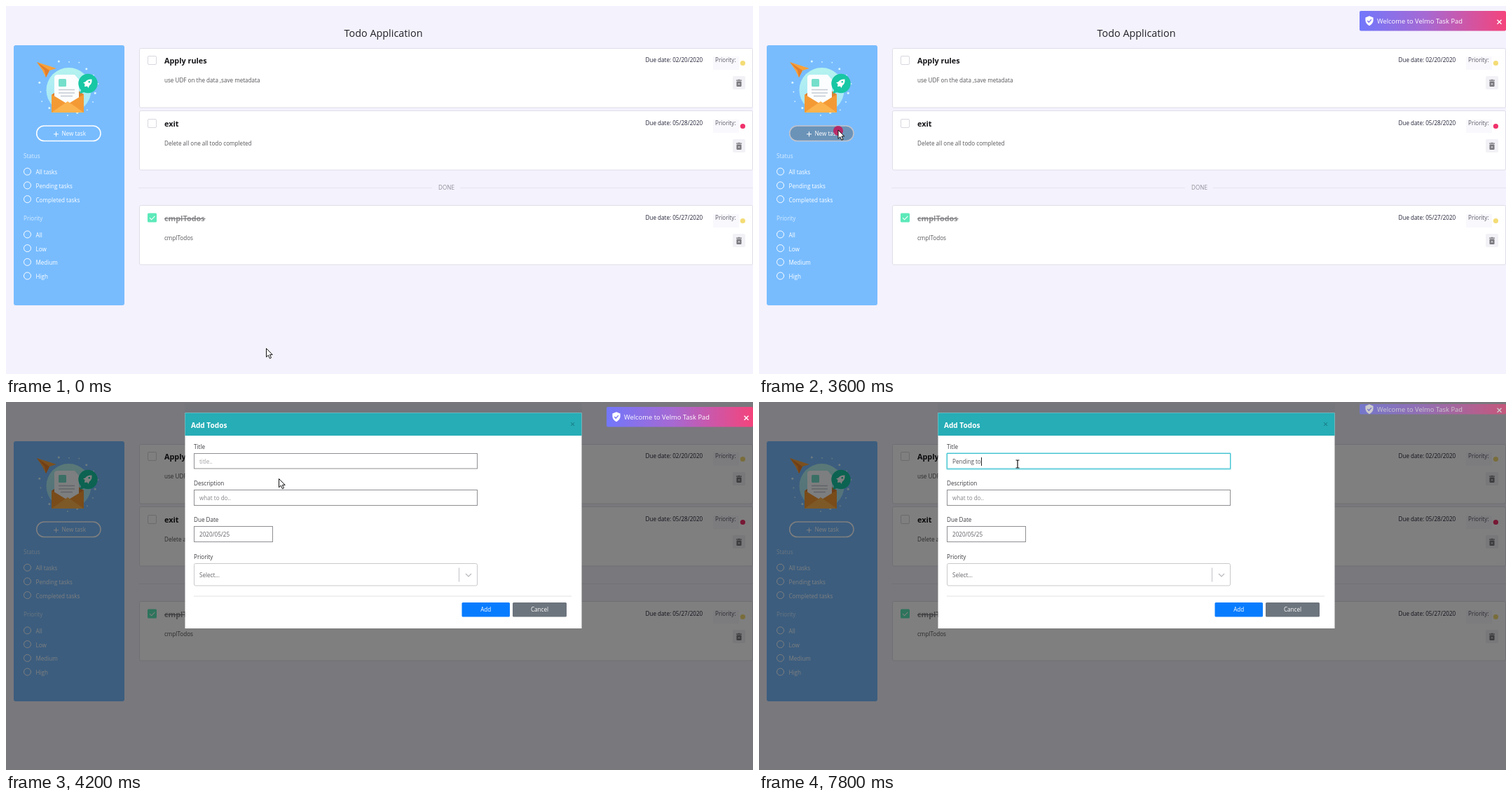
These frames come from a looping animation (1066 by 525 pixels, 8000 ms). An HTML page:

```html
<!DOCTYPE html>
<html lang="en">
<head>
<meta charset="utf-8">
<title>Todo board</title>
<style>
  html, body { margin: 0; width: 100%; height: 100%; overflow: hidden; background: #f4f2fc; }
  svg { display: block; width: 1066px; height: 525px; }
  text { font: 8.12px "Open Sans", "Noto Sans", sans-serif; white-space: pre; }
  .mid { text-anchor: middle; }
  .head { font-size: 14.4px; font-weight: 500; }
  .bold { font-size: 10.85px; font-weight: 700; }
</style>
</head>
<body>
<svg id="stage" viewBox="0 0 1066 525" xmlns="http://www.w3.org/2000/svg"></svg>
<script>
const LOOP = 8000, STEP = 200;
const stage = document.getElementById('stage');

const text = (x, y, s, fill, more = '') => `<text x="${x}" y="${y}" fill="${fill}" ${more}>${s}</text>`;
const rect = (x, y, w, h, fill, more = '') =>
  `<rect x="${x}" y="${y}" width="${w}" height="${h}" fill="${fill}" ${more}/>`;
const circle = (x, y, r, fill, more = '') => `<circle cx="${x}" cy="${y}" r="${r}" fill="${fill}" ${more}/>`;
const path = (d, fill, more = '') => `<path d="${d}" fill="${fill}" ${more}/>`;
const line = (d, color, width = 1) => path(d, 'none', `stroke="${color}" stroke-width="${width}"`);
const group = (id, body, more = '') => `<g id="${id}" ${more}>${body}</g>`;

const tasks = [
  { top: 60.5, dy: 0, name: 'Apply rules', note: 'use UDF on the data ,save metadata', due: '02/20/2020', dot: '#f4dc76' },
  { top: 149.5, dy: 90, name: 'exit', note: 'Delete all one all todo completed', due: '05/28/2020', dot: '#f0316b' },
  { top: 284.5, dy: 225, name: 'cmplTodos', note: 'cmplTodos', due: '05/27/2020', dot: '#f4dc76', done: true }
];

function bin(y, box, ink, hole) {
  return rect(1037, y - 10, 18, 19, box, 'rx="2"') +
    rect(1042.5, y - 2.5, 7, 7.5, ink, 'rx="1"') + rect(1042, y - 4.5, 8, 1.2, ink) +
    rect(1044.5, y - 5.2, 3, 1, ink) +
    line(`M1044.7 ${y}l2.6 2.8m0 -2.8l-2.6 2.8`, hole, .8);
}

function card({ top, dy, name, note, due, dot, done }) {
  const box = done
    ? rect(202, 70.5, 13, 13, '#5ce9ba', 'rx="1.5"') + line('M205 77.2l2.6 2.6 4.8-5', '#fff', 1.1)
    : rect(202.5, 71.5, 12, 12, '#fff', 'rx="1.5" stroke="#d8d7df"');
  return rect(190.5, top, 875, 84.5, '#fff', 'rx="2" stroke="#dfdde7"') +
    `<g transform="translate(0 ${dy})">` + box +
    text(226, 82, name, done ? '#8e8e92' : '#16161a', 'class="bold"') +
    (done ? line('M226 78.5H284.5', '#77777b', 1.2) : '') +
    text(226, 108.6, note, '#55555a') +
    text(912.5, 80.3, 'Due date: ' + due, '#222238') +
    rect(1009, 72, 37, 19, '#f9f8fd') + text(1012, 80.3, 'Priority:', '#5a5a66') +
    circle(1051.4, 81.5, 3.6, dot) + bin(110, '#f2f1f6', '#77777c', '#f2f1f6') + '</g>';
}

function picture() {
  let dots = '';
  for (let i = 0; i < 18; i++) {
    const a = i * .349 + .2, r = 39 + (i * 7 % 5);
    dots += circle((89 + r * Math.cos(a)).toFixed(1), (117 + r * .93 * Math.sin(a)).toFixed(1), i % 3 ? .9 : 1.5, '#d9f6ff');
  }
  return dots + circle(89.5, 120, 32, 'url(#glow)') +
    path('M44 80L72 89 62 92 57 102 52 92Z', '#f7a13c') + path('M44 80L62 92 57 102 55 92Z', '#e37f2c') +
    path('M66 126L88 111 111 126V152H66Z', '#dd8230') +
    path('M69 102Q69 98 74 98H98L104 105V145H69Z', '#fbfdff') +
    rect(75, 104, 11, 11, '#76dfcb', 'rx="1.5"') +
    line('M75 119.5H98M75 124H98M78 128.5H95', '#c4cad3', 1.3) +
    path('M65 126L88 140 111 126V152H65Z', '#f49a35') + path('M65 152L88 136 111 152Z', '#fbb34e') +
    circle(117, 110.5, 13.7, '#18c7a4') + path('M108 118L105 125 115 122Z', '#18c7a4') +
    path('M122.5 104.5Q116 104 113.5 108L110 109.5 112.5 111 112 115 116 114.5 117.5 117 119 113.5Q123 111 122.5 104.5Z', '#fff') +
    circle(118.8, 108.2, 1.3, '#18c7a4');
}

function radios(title, y, names) {
  return text(25, y, title, '#d6ebff') + names.map((name, i) => {
    const cy = y + 20 + i * 19.7;
    return circle(30.5, cy - .3, 5, 'none', 'stroke="#fff"') + text(42.5, cy + 3.7, name, '#fff');
  }).join('');
}

function board() {
  return text(538.5, 44, 'Todo Application', '#222228', 'class="head mid"') +
    rect(11, 56, 158, 371, '#78bcfe', 'rx="3"') + picture() +
    rect(43.7, 171, 91.3, 21.5, 'transparent', 'id="button" rx="10.7" stroke="#fff" stroke-width="1.5"') +
    line('M68 182.8H75M71.5 179.3V186.3', '#fff') + text(79.5, 184.7, 'New task', '#fff') +
    radios('Status', 216.5, ['All tasks', 'Pending tasks', 'Completed tasks']) +
    radios('Priority', 306.2, ['All', 'Low', 'Medium', 'High']) +
    tasks.map(card).join('') +
    line('M189 259.5H608M648 259.5H1066', '#e6e4ee') + text(628.5, 262.3, 'DONE', '#8f8f99', 'class="mid"');
}

function blank() {
  return text(538.5, 44, 'Todo Application', '#fff', 'class="head mid"') +
    rect(11, 55, 158, 372.5, '#fff', 'rx="2"') +
    rect(43.7, 171, 91.3, 21.5, 'none', 'rx="10.7" stroke="#faf9fd"') +
    line('M190 259.5H608M648 259.5H1066', '#fff') + text(628.5, 262.3, 'DONE', '#fff', 'class="mid"') +
    tasks.map(({ top, dy, name, note, due }) =>
      rect(190, top - .5, 876, 85.5, '#fff') + `<g transform="translate(0 ${dy})">` +
      text(226, 82, name, '#f8f7fc', 'class="bold"') + text(226, 108.6, note, '#f8f7fc') +
      rect(910, 71, 88, 12, '#f8f7fd') + text(912.5, 80.3, 'Due date: ' + due, '#fff') +
      rect(1009, 71, 36, 20, '#f7f6fc') + bin(110, '#f0eff8', '#fff', '#fff') + '</g>').join('') +
    group('spinner', path(crescent(21.5, -72, 145, 4.2), '#d8086c') + path(crescent(14.5, -50, 160, 3.2), '#d8086c')) +
    path('M0 509.5H354Q357 509.5 357 512.5V525H0Z', '#32323a') +
    text(4, 521, 'Connecting...', '#b9b9bd', 'style="font-size:9.07px"');
}

// Tapered arc: a circle segment minus a shallower one through the same ends.
function crescent(r, from, to, w) {
  const rad = Math.PI / 180, half = (to - from) / 2 * rad;
  const p = a => (r * Math.cos(a * rad)).toFixed(2) + ' ' + (r * Math.sin(a * rad)).toFixed(2);
  const h = r * Math.sin(half), s = r * (1 - Math.cos(half)) - w, q = (h * h + s * s) / (2 * s);
  return `M${p(from)}A${r} ${r} 0 ${half > Math.PI / 2 ? 1 : 0} 1 ${p(to)}A${q} ${q} 0 ${s > h ? 1 : 0} 0 ${p(from)}Z`;
}

function dialog() {
  const field = (y, w, h) => rect(268.5, y, w, h, '#fff', 'stroke="#8f8f94"');
  const label = (y, s) => text(268, y, s, '#3c3c42');
  return rect(255.5, 15.5, 566, 307.5, '#fff') + rect(255.5, 15.5, 566, 32.5, '#26adb6') +
    text(264, 37, 'Add Todos', '#fff', 'class="bold" style="font-size:10.1px"') +
    line('M806.3 29.3l4.6 4.6m0-4.6l-4.6 4.6', '#176e76') +
    label(66.6, 'Title') + label(118.8, 'Description') + label(171.4, 'Due Date') + label(223.6, 'Priority') +
    field(73.5, 404, 21.5) + field(125.5, 404, 22) + field(177.5, 112, 22) +
    rect(268.5, 230.5, 404, 31.5, '#fff', 'rx="2" stroke="#c9c9cc"') +
    group('focus', rect(268.5, 73.5, 404, 22, '#fff', 'stroke="#a9e6ed" stroke-width="3" rx="1"') +
      rect(268.5, 73.5, 404, 21.5, '#fff', 'stroke="#45c3d0"')) +
    text(276, 88, 'title..', '#a0a0a5', 'id="hint"') + text(276, 88, '', '#505057', 'id="typed"') +
    rect(276, 79, 1, 12, '#222', 'id="caret"') +
    text(276, 140, 'what to do..', '#85858a') + text(276, 192, '2020/05/25', '#5e5e64') +
    text(276, 249.6, 'Select...', '#66666c') +
    line('M646.5 236.5V256.5', '#c3c3c6') + line('M656 245l4 4 4-4', '#b8b8bd', 1.2) +
    line('M268 277H807', '#e2e2e5') +
    rect(650.5, 286, 68.5, 20.5, '#087cff', 'rx="1.5"') + rect(723, 286, 77, 20.5, '#6c747d', 'rx="1.5"') +
    text(684.7, 299, 'Add', '#fff', 'class="mid"') + text(761.5, 299, 'Cancel', '#fff', 'class="mid"');
}

function toast() {
  return rect(857, -14.2, 209, 28.4, 'url(#warm)', 'id="band" rx="2"') +
    path('M871 -7L876.6 -4.6V-.5Q876 4.5 871 7 866 4.5 865.4 -.5V-4.6Z', '#fff') +
    line('M868.3 -.2l2 2.1 3.6-4', '#7a76f2', 1.4) +
    text(882, 3.4, 'Welcome to Velmo Task Pad', '#fff', 'style="font-size:9.4px;font-weight:500"') +
    line('M1053.5 -1.5l6 6m0-6l-6 6', '#fff', 1.4);
}

stage.innerHTML = `<defs>
  <linearGradient id="warm"><stop stop-color="#7277fb"/><stop offset=".45" stop-color="#a669d3"/><stop offset="1" stop-color="#f4447c"/></linearGradient>
  <linearGradient id="glow" x2="0" y2="1"><stop stop-color="#b4f3ee"/><stop offset="1" stop-color="#a5e4fb"/></linearGradient>
  </defs>` +
  group('board', board()) + group('blank', blank()) +
  circle(113, 178, 7, '#c11658', 'id="ripple"') +
  rect(0, 0, 1066, 525, '#000', 'id="shade"') +
  group('trail', rect(255, 2, 567, 14, '#6d7079', 'opacity=".35"')) +
  group('dialog', dialog()) + group('toast', toast()) +
  group('arrow', path('M.5 .5V12.8L3.3 10.2 5.4 14.8 7.5 13.8 5.4 9.4H9.2Z', '#fff', 'stroke="#111"')) +
  group('beam', line('M-2.5 -5.5H-.7L0 -5 .7 -5.5H2.5M0 -5V5M-2.5 5.5H-.7L0 5 .7 5.5H2.5', '#111', 1.2));

const el = {};
stage.querySelectorAll('[id]').forEach(n => el[n.id] = n);

// Rows of [time, ...values], linear in between.
function at(rows, t) {
  let i = 0;
  while (i < rows.length - 1 && rows[i + 1][0] <= t) i++;
  const a = rows[i], b = rows[i + 1] || a;
  const k = b === a ? 0 : Math.max(0, (t - a[0]) / (b[0] - a[0]));
  return a.slice(1).map((v, j) => v + (b[j + 1] - v) * k);
}

const pointer = [
  [0, 371, 488], [800, 300, 254], [1000, 300, 254], [1400, 146, 190], [1800, 320, 90],
  [2000, 384, 30], [2200, 372, 9], [2400, 350, -30], [2600, 300, 20], [2800, 214, 106],
  [3200, 145, 165], [3400, 118, 178], [3600, 112.5, 176.5], [3800, 221, 230.5],
  [4000, 330, 190], [4200, 389, 109], [4400, 380, 94], [4800, 373, 91], [5200, 369, 88.5]
];
const shade = [[3600, 0], [3800, .1], [4000, .38], [4200, .5]];
const drop = [[3800, 0, -30], [4000, .8, -13], [4200, 1, 0]];
const notice = [
  [3200, 209, 21.2, 28.4, 1], [3400, 60, 21.2, 28.4, 1], [3600, 0, 21.2, 28.4, 1],
  [7600, 0, 21.2, 28.4, 1], [7800, 0, 10.3, 14.5, .62], [8000, 0, 0, 0, 0]
];
const glow = [[4600, 0], [4800, .6], [5000, 1]];
const letters = [[6000, 0], [6800, 4], [7000, 6], [7800, 10]];

const show = (node, on) => node.setAttribute('visibility', on ? 'visible' : 'hidden');
const move = (node, x, y) => node.setAttribute('transform', `translate(${x} ${y})`);
const fade = (node, v) => node.setAttribute('opacity', v);

function draw(t) {
  const loading = t >= 2600 && t < 3200;
  show(el.board, !loading);
  show(el.blank, loading);
  el.spinner.setAttribute('transform', `translate(505 284.5) rotate(${(t - 2800) * .45})`);

  const [px, py] = at(pointer, t), inField = t >= 4400;
  show(el.arrow, !inField);
  show(el.beam, inField);
  move(el.arrow, px, py);
  move(el.beam, px, py);

  const hover = t >= 3400 && t < 3800;
  el.button.setAttribute('fill', hover ? '#6b93b8' : 'transparent');
  el.button.setAttribute('stroke', hover ? '#c3c3cb' : '#fff');
  show(el.ripple, t >= 3600 && t < 4000);
  el.ripple.setAttribute('r', at([[3600, 7], [3800, 16]], t)[0]);
  fade(el.ripple, at([[3600, .85], [3800, .4]], t)[0]);

  fade(el.shade, at(shade, t)[0]);
  show(el.trail, t >= 4200);
  const [solid, dy] = at(drop, t);
  fade(el.dialog, solid);
  move(el.dialog, 0, dy);

  const [tx, ty, h, o] = at(notice, t);
  move(el.toast, tx, ty);
  fade(el.toast, o);
  el.band.setAttribute('y', -h / 2);
  el.band.setAttribute('height', h);

  fade(el.focus, at(glow, t)[0]);
  const n = Math.floor(at(letters, t)[0] + .01);
  el.typed.textContent = 'Pending to'.slice(0, n);
  fade(el.hint, n ? 0 : 1);
  const blink = t >= 4800 && t < 5400 || t >= 5800;
  fade(el.caret, blink ? 1 : 0);
  el.caret.setAttribute('x', 276 + (n ? Math.round(el.typed.getComputedTextLength()) : 0));
}

const start = performance.now();
function tick() {
  const t = (performance.now() - start) % LOOP;
  draw(Math.floor(t / STEP) * STEP);
  requestAnimationFrame(tick);
}
tick();
</script>
</body>
</html>
```
